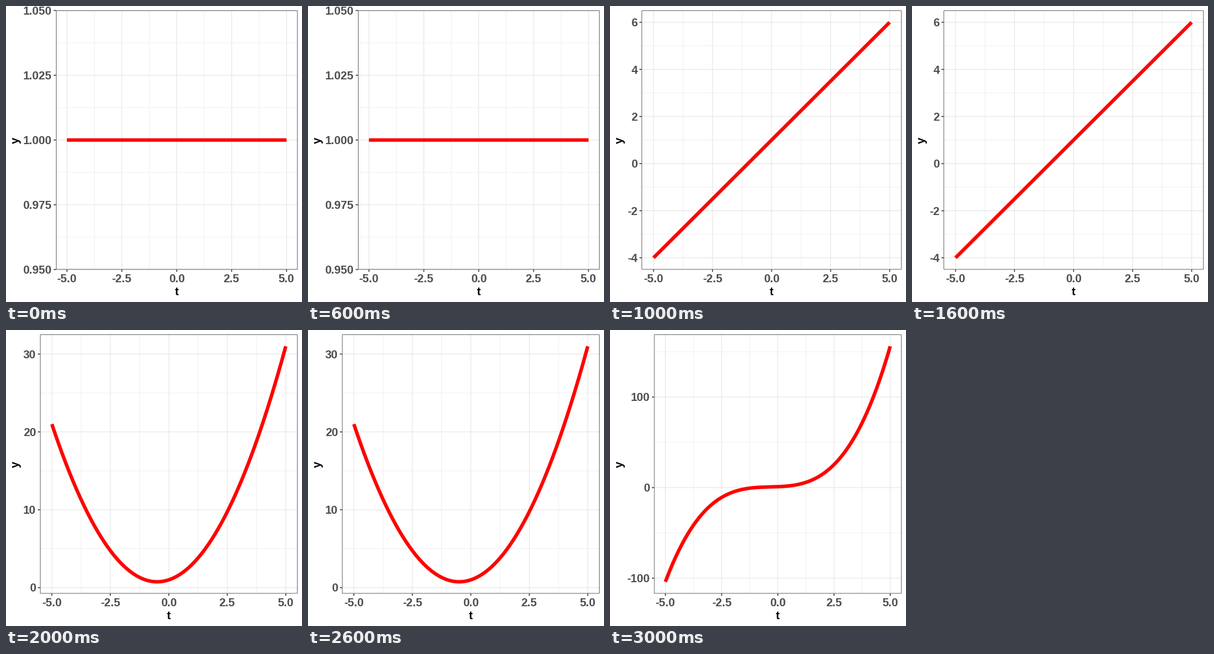
Write a matplotlib script that moves like this. It is 480 px wide and 480 px high and loops after 4000 ms.

```python
import matplotlib.pyplot as plt
import numpy as np
from matplotlib.animation import FuncAnimation
from matplotlib.patches import Rectangle

plt.rcParams["font.family"] = "Liberation Sans"
plt.rcParams["font.weight"] = "bold"
plt.rcParams["path.snap"] = False

SIZE, DPI = 480, 96
PX = 72 / DPI                                # points per pixel
TOP, RIGHT, BOTTOM = 7.33, 472.67, 427.4     # panel edges
TICK, GAP = 3.67, 6.6
GRID, DARK, LABEL = "#ebebeb", "#333333", "#4d4d4d"
LINE = 1.42
X_MAJOR = np.arange(-5, 5.1, 2.5)
X_MINOR = np.arange(-3.75, 4, 2.5)

# Per degree: panel left edge, y limits, major breaks, minor breaks, label format
PANELS = [
    (81.0, (0.95, 1.05), np.linspace(0.95, 1.05, 5), np.linspace(0.9625, 1.0375, 4), ".3f"),
    (51.4, (-4.5, 6.5), range(-4, 7, 2), range(-3, 6, 2), "d"),
    (55.4, (-0.7625, 32.5125), range(0, 31, 10), range(5, 26, 10), "d"),
    (71.6, (-117, 169), range(-100, 101, 100), range(-50, 151, 100), "d"),
]

fig = plt.figure(figsize=(SIZE / DPI, SIZE / DPI), dpi=DPI, facecolor="white")
ax = fig.add_axes([0, 0, 1, 1])


def stroke(xs, ys, color, width, z):
    ax.plot(xs, ys, color=color, lw=width * PX, zorder=z,
            solid_capstyle="butt", solid_joinstyle="round")


def label(x, y, text, color=LABEL, **kw):
    ax.text(x, y, text, color=color, fontsize=14, **kw)


def draw(degree):
    ax.clear()
    ax.set(xlim=(0, SIZE), ylim=(SIZE, 0))
    ax.axis("off")
    left, (low, high), y_major, y_minor, fmt = PANELS[degree]

    def to_x(t):
        return left + (t + 5.5) / 11 * (RIGHT - left)

    def to_y(v):
        return BOTTOM - (v - low) / (high - low) * (BOTTOM - TOP)

    for x_breaks, y_breaks, width, z in ((X_MINOR, y_minor, LINE / 2, 1),
                                         (X_MAJOR, y_major, LINE, 2)):
        for t in x_breaks:
            stroke([to_x(t)] * 2, [TOP, BOTTOM], GRID, width, z)
        for v in y_breaks:
            stroke([left, RIGHT], [to_y(v)] * 2, GRID, width, z)

    t = np.linspace(-5, 5, 201)
    y = sum(t ** k for k in range(degree + 1))
    stroke(to_x(t), to_y(y), "#ff0000", 5.69, 3)

    # Only the inner half of the border is visible
    half = LINE / 2
    ax.add_patch(Rectangle((left + half / 2, TOP + half / 2),
                           RIGHT - left - half, BOTTOM - TOP - half,
                           fill=False, ec=DARK, lw=half * PX, zorder=4))

    for t in X_MAJOR:
        stroke([to_x(t)] * 2, [BOTTOM, BOTTOM + TICK], DARK, LINE, 5)
        label(to_x(t), 448, f"{t:.1f}", ha="center", va="baseline")
    for v in y_major:
        stroke([left - TICK, left], [to_y(v)] * 2, DARK, LINE, 5)
        label(left - GAP, to_y(v) + 6.7, format(v, fmt), ha="right", va="baseline")

    label((left + RIGHT) / 2, 469, "t", "black", ha="center", va="baseline")
    label(21, (TOP + BOTTOM) / 2, "y", "black", ha="center", va="baseline",
          rotation=90, rotation_mode="anchor")
    return []


anim = FuncAnimation(fig, draw, frames=len(PANELS), interval=1000,
                     init_func=lambda: [], repeat=True, repeat_delay=0)
plt.show()
```
